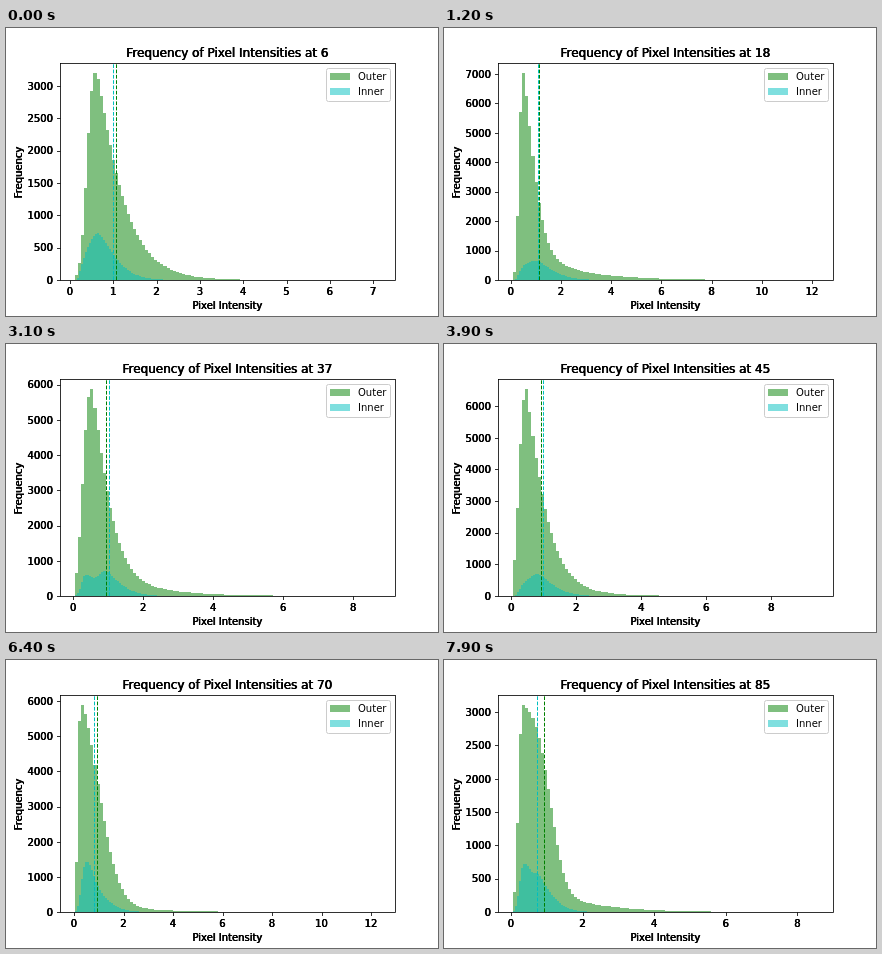
Animation, 432 px wide and 288 px high, one loop 8000 ms. Source, as an HTML page with a canvas:

```html
<!DOCTYPE html>
<html lang="en">
<head>
<meta charset="utf-8">
<title>Frequency of Pixel Intensities</title>
<style>
  html, body { margin: 0; width: 100%; height: 100%; overflow: hidden; background: #fff; }
  canvas { display: block; width: 432px; height: 288px; }
</style>
</head>
<body>
<canvas id="chart" width="432" height="288"></canvas>
<script>
const ctx = document.getElementById('chart').getContext('2d');
const STEP_MS = 100, STEPS = 80, FIRST_LABEL = 6;
const RIGHT = 388.8, BASE = 252, TOP = 36, PEAK_PX = 207;
const START = 69.2, BIN = 3.044, BINS = 100, INNER_BIN = 2;
const RISE_POWER = 2.5, TAIL_LENGTH = 14;
const GREEN = '#008000', CYAN = '#00bfbf';

// Axes: zero (px), unit (px per value), peak (count), means (values).
// Outer set, in bins: mode, rise (width), fall (width), power, tail (share).
// Inner set, in px: spike and hump heights, hump centre and spread.
const keys = [
  { step: 0, zero: 64, unit: 43.3, peak: 3200, outerMean: 1.074, innerMean: 1.005,
    mode: 6.5, rise: 3.8, fall: 9.2, power: 1.15, tail: .03, spike: 0, hump: 47, center: 22, spread: 22 },
  { step: 12, zero: 66.8, unit: 25.1, peak: 7030, outerMean: 1.143, innerMean: 1.104,
    mode: 3, rise: 1.88, fall: 4.4, power: 1.4, tail: .17, spike: 5, hump: 19, center: 23, spread: 21 },
  { step: 23, zero: 67, unit: 37.5, peak: 5215, outerMean: .973, innerMean: 1.107,
    mode: 6, rise: 4.1, fall: 5.8, power: 1.4, tail: .28, spike: 31, hump: 28, center: 35, spread: 19 },
  { step: 39, zero: 67.3, unit: 32.5, peak: 6540, outerMean: .929, innerMean: .991,
    mode: 4, rise: 3.2, fall: 6.6, power: 1.12, tail: .05, spike: 4, hump: 22, center: 24, spread: 20 },
  { step: 52, zero: 68, unit: 26.1, peak: 6900, outerMean: .939, innerMean: 1.015,
    mode: 3.5, rise: 2.85, fall: 6.5, power: 1.55, tail: .05, spike: 15, hump: 18, center: 24, spread: 18 },
  { step: 64, zero: 68, unit: 24.75, peak: 5890, outerMean: .949, innerMean: .828,
    mode: 1.5, rise: 1.3, fall: 8.2, power: 1.75, tail: .06, spike: 26, hump: 30, center: 16, spread: 17 },
  { step: 79, zero: 67, unit: 35.8, peak: 3107, outerMean: .936, innerMean: .74,
    mode: 3, rise: 2.14, fall: 10.2, power: 2.8, tail: .2, spike: 38, hump: 37, center: 24, spread: 17 }
];

function stateAt(step) {
  const i = keys.findIndex(k => k.step >= Math.max(step, 1));
  const a = keys[i - 1], b = keys[i];
  const u = (step - a.step) / (b.step - a.step);
  return Object.fromEntries(Object.keys(a).map(k => [k, a[k] + (b[k] - a[k]) * u]));
}

const decay = (d, width, power) => Math.exp(-Math.pow(Math.abs(d) / width, power));

function outerHeight(s, bin) {
  const d = bin - s.mode;
  if (d < 0) return decay(d, s.rise, RISE_POWER);
  return (1 - s.tail) * decay(d, s.fall, s.power) + s.tail * decay(d, TAIL_LENGTH, 1);
}

function innerHeight(s, x) {
  const spike = s.spike * decay(x - 9, x < 9 ? 5 : 8, 2);
  const d = x - s.center;
  const hump = s.hump * (d < 0 ? decay(d, s.spread * .75, 2) : decay(d, s.spread, 1.4));
  return spike + hump * (1 - decay(x, 4, 2));
}

function bars(start, width, heights, color) {
  ctx.globalAlpha = .5;
  ctx.fillStyle = color;
  heights.forEach((height, i) => {
    const x = Math.round(start + i * width), h = Math.round(height);
    ctx.fillRect(x, BASE - h, Math.round(start + (i + 1) * width) - x, h);
  });
  ctx.globalAlpha = 1;
}

function histograms(s) {
  const outer = Array.from({ length: BINS }, (_, i) => outerHeight(s, i));
  const scale = PEAK_PX / Math.max(...outer);
  bars(START, BIN, outer.map(h => h * scale), GREEN);
  bars(69, INNER_BIN, Array.from({ length: BINS }, (_, i) => innerHeight(s, i * INNER_BIN)), CYAN);
}

// Heavy text is darkened by overprinting with a slight spread.
function text(str, x, y, { size = 10, align = 'center', heavy = true } = {}) {
  ctx.font = size + 'px "DejaVu Sans", sans-serif';
  ctx.textAlign = align;
  ctx.fillStyle = '#000';
  for (const dx of heavy ? [-.3, 0, .3] : [0]) ctx.fillText(str, x + dx, y);
}

function line(x1, y1, x2, y2, color = '#000', width = .8, dash = []) {
  ctx.strokeStyle = color;
  ctx.lineWidth = width;
  ctx.setLineDash(dash);
  ctx.beginPath();
  ctx.moveTo(x1, y1);
  ctx.lineTo(x2, y2);
  ctx.stroke();
  ctx.setLineDash([]);
}

function meanLine(s, mean, color) {
  const x = Math.floor(s.zero + mean * s.unit) + .5;
  line(x, BASE, x, TOP, color, 1, [3.7, 1.6]);
}

const snap = v => Math.round(v) + .5;

function axes(s) {
  const xMax = (RIGHT - s.zero) / s.unit;
  const xStep = xMax < 8.8 ? 1 : 2;
  for (let v = 0; v <= xMax; v += xStep) {
    const x = s.zero + v * s.unit;
    line(snap(x), 252.5, snap(x), 256);
    text(v, x, 267);
  }
  const yMax = s.peak * 1.05;
  const yStep = yMax <= 4500 ? 500 : 1000;
  for (let v = 0; v <= yMax; v += yStep) {
    const y = BASE - v * PEAK_PX / s.peak;
    line(51, snap(y), 54.5, snap(y));
    text(v, 47, Math.round(y + 3.8), { align: 'right' });
  }
  ctx.strokeStyle = '#000';
  ctx.lineWidth = .8;
  ctx.strokeRect(54.5, 35.5, 335, 217);
}

function legend() {
  ctx.beginPath();
  ctx.roundRect(320.5, 40.5, 64, 33, 2);
  ctx.fillStyle = 'rgba(255,255,255,.8)';
  ctx.fill();
  ctx.strokeStyle = '#ccc';
  ctx.lineWidth = 1;
  ctx.stroke();
  [['Outer', GREEN], ['Inner', CYAN]].forEach(([name, color], i) => {
    bars(324, 20, [7], color, ctx.save(), ctx.translate(0, 52 + i * 15 - BASE));
    ctx.restore();
    text(name, 352, 52 + i * 15, { align: 'left', heavy: false });
  });
}

function draw(step) {
  const s = stateAt(step);
  ctx.fillStyle = '#fff';
  ctx.fillRect(0, 0, 432, 288);
  histograms(s);
  meanLine(s, s.innerMean, CYAN);
  meanLine(s, s.outerMean, GREEN);
  axes(s);
  text('Frequency of Pixel Intensities at ' + (FIRST_LABEL + step), 221.4, 29, { size: 12 });
  text('Pixel Intensity', 221.4, 281);
  ctx.save();
  ctx.translate(16, 144.5);
  ctx.rotate(-Math.PI / 2);
  text('Frequency', 0, 0);
  ctx.restore();
  legend();
}

const begin = performance.now();
let shown = -1;
function tick() {
  const step = Math.floor((performance.now() - begin) / STEP_MS) % STEPS;
  if (step !== shown) draw(shown = step);
  requestAnimationFrame(tick);
}
tick();
</script>
</body>
</html>
```
